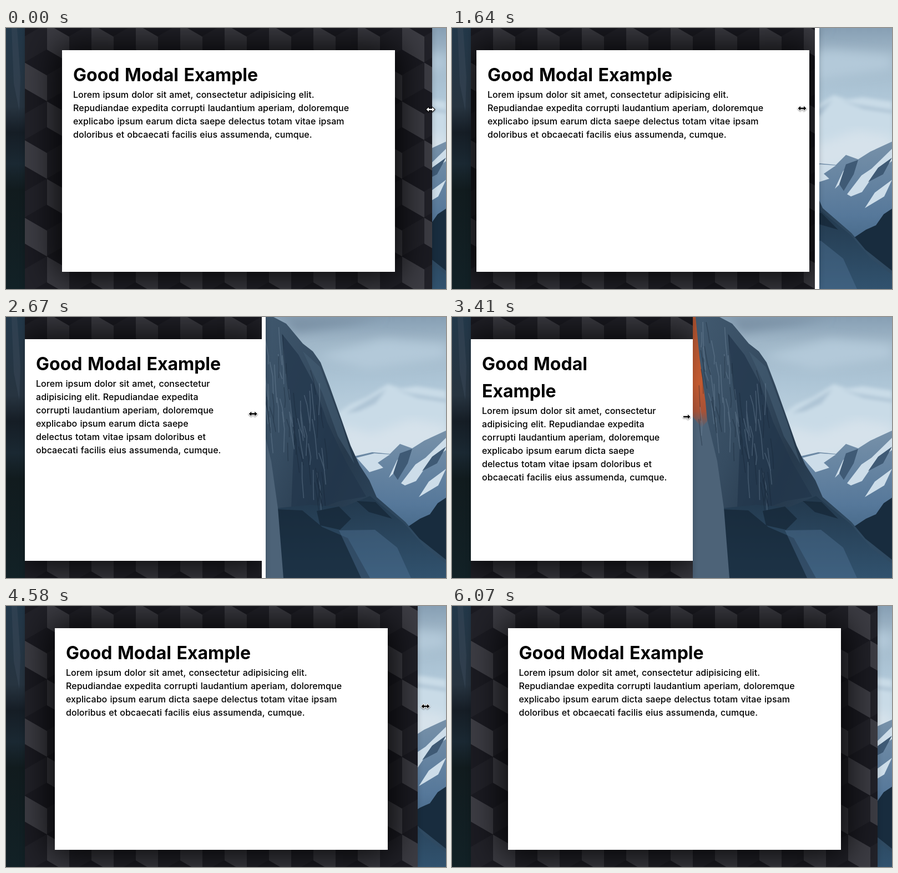
An HTML page that plays this animation: 793x471 px, repeating every 6170 ms.

```html
<!DOCTYPE html>
<html lang="en">
<head>
<meta charset="utf-8">
<style>
  html, body { margin: 0; width: 100%; height: 100%; overflow: hidden; background: #22303f; }
  #stage { position: relative; width: 793px; height: 471px; overflow: hidden; }
  svg { position: absolute; left: 0; top: 0; }
  #win { position: absolute; left: 34px; top: 0; height: 471px; overflow: hidden;
    background: #fff; box-shadow: 0 0 10px rgba(0,0,0,.2); }
  #page { position: absolute; left: 0; top: 0; height: 471px; overflow: hidden;
    background-color: #556;
    background-image:
      linear-gradient(30deg, #445 12%, transparent 12.5%, transparent 87%, #445 87.5%),
      linear-gradient(150deg, #445 12%, transparent 12.5%, transparent 87%, #445 87.5%),
      linear-gradient(30deg, #445 12%, transparent 12.5%, transparent 87%, #445 87.5%),
      linear-gradient(150deg, #445 12%, transparent 12.5%, transparent 87%, #445 87.5%),
      linear-gradient(60deg, #99a 25%, transparent 25.5%, transparent 75%, #99a 75%),
      linear-gradient(60deg, #99a 25%, transparent 25.5%, transparent 75%, #99a 75%);
    background-size: 80px 140px;
    background-position: 0 -8px, 0 -8px, 40px 62px, 40px 62px, 0 -8px, 40px 62px; }
  #shade { position: absolute; inset: 0; background: rgba(0,0,0,.6); }
  #modal { position: absolute; top: 40px; height: 400px; background: #fff;
    box-shadow: 0 0 60px 10px rgba(0,0,0,.9);
    font-family: Inter, "Open Sans", sans-serif; color: #000; white-space: pre; }
  h1, p { margin: 0 0 0 20px; }
  h1 { padding-top: 20px; font-size: 32px; line-height: 49px; font-weight: 700; word-spacing: 2px; }
  p { margin-top: -1px; font-size: 16px; line-height: 24px; font-weight: 500;
    letter-spacing: .04px; word-spacing: .8px; }
  #cursor { filter: drop-shadow(0 1px 1px rgba(0,0,0,.5)); }
</style>
</head>
<body>
<div id="stage">
  <svg width="793" height="471">
    <defs>
      <linearGradient id="sky" x2="0" y2="1">
        <stop offset="0" stop-color="#879fb4"/><stop offset=".1" stop-color="#a0b7c8"/>
        <stop offset=".25" stop-color="#adc5d6"/><stop offset=".45" stop-color="#c2d5e2"/>
      </linearGradient>
      <linearGradient id="cliff" x2="1" y2=".5">
        <stop offset="0" stop-color="#425a70"/><stop offset=".35" stop-color="#364c61"/>
        <stop offset=".6" stop-color="#26394c"/><stop offset="1" stop-color="#2f4a62"/>
      </linearGradient>
      <linearGradient id="hill" x2="0" y2="1">
        <stop offset="0" stop-color="#22384c"/><stop offset="1" stop-color="#31526e"/>
      </linearGradient>
      <linearGradient id="ridge" x2="0" y2="1">
        <stop offset="0" stop-color="#7791a9"/><stop offset=".5" stop-color="#56789a"/>
        <stop offset="1" stop-color="#2f506c"/>
      </linearGradient>
      <linearGradient id="flame" x2="0" y2="1">
        <stop offset="0" stop-color="#a8502f"/><stop offset=".6" stop-color="#c25a30"/>
        <stop offset=".85" stop-color="#a85237"/><stop offset="1" stop-color="#4d6378"/>
      </linearGradient>
      <linearGradient id="side" x2="0" y2="1">
        <stop offset="0" stop-color="#233849"/><stop offset=".3" stop-color="#273440"/>
        <stop offset=".4" stop-color="#151d25"/><stop offset=".52" stop-color="#1a2832"/>
        <stop offset=".62" stop-color="#111b1e"/><stop offset="1" stop-color="#122126"/>
      </linearGradient>
      <filter id="soft"><feGaussianBlur stdDeviation="9"/></filter>
      <filter id="mist"><feGaussianBlur stdDeviation="3"/></filter>
    </defs>
    <rect width="793" height="471" fill="url(#sky)"/>
    <g filter="url(#soft)">
      <path d="M500 0h180l-60 14-100 14z" fill="#7c92a6"/>
      <path d="M560 70l120-30 113 10v25l-140 20z" fill="#b3c9d9"/>
    </g>
    <g filter="url(#mist)">
      <path d="M590 180l30-22 30-13 38-24 24 8 28-4 53 8v125H600z" fill="#c9dbe7"/>
      <path d="M612 174l40-24 34-20-20 26-30 14zM700 130l30 8 63 10v6l-52-8z" fill="#aec4d5"/>
    </g>
    <g filter="url(#soft)">
      <path d="M600 195l60 15 70-25 63 10v30l-90 25-90 15z" fill="#d6e2eb"/>
    </g>
    <path d="M625 252l35-8 32 3 18-18 22 8 22-14 39-18v266H640z" fill="url(#ridge)"/>
    <path d="M632 254l32-8 28 2-22 15 10 9-25 8zM712 300l26-34 18-12 37-36v22l-32 24-22 32-20 8z
      M690 290l15-32 18-14-5 20zM744 325l18-28 31-23-14 30z" fill="#cddde9"/>
    <path d="M698 282l12-36 22-8-8 26-18 30zM750 278l18-26 25-18-16 30z" fill="#3f5a75"/>
    <path d="M722 380l24-16 18-8 14-20 15-10v145h-70z" fill="#182c3e"/>
    <path d="M434 0h48l23 12 30 36 18 14 14 20 16 42 22 62 16 46 16 35 18 28 13 30 52 45 25 30 48 38v33H434z"
      fill="url(#cliff)"/>
    <path d="M497 30l30 38 28 52 24 70 34 72 36 62-48 8-42 15-45 1 5-130z" fill="#22364a" opacity=".7"/>
    <path d="M535 62l31 28 38 100 24 75-30-50-28-78z" fill="#466076" opacity=".55"/>
    <path d="M488 345l60-6 60 4 48-20 62 50 38 44 37 28v26H498z" fill="url(#hill)"/>
    <path d="M490 347l44 2 36 30 46 20 40 72H498zM632 332l34 2 30 30-42-12zM560 350l40-8 22 22-20 20-36-8z"
      fill="#152635" opacity=".7"/>
    <path d="M600 385l65-1 40 32 25 55h-90z" fill="#54779a" opacity=".4"/>
    <path d="M434 150l20 10 6 26 18 74 12 85 10 126h-66z" fill="#4d6378"/>
    <path d="M434 0h5l7 72 11 82 3 34-10 12-16-20z" fill="url(#flame)"/>
    <g id="streaks" fill="none" stroke-width="1.5" opacity=".35"></g>
    <rect width="34" height="471" fill="url(#side)"/>
    <path d="M10 0h10l6 90-2 60-10-50z" fill="#3b4958" opacity=".5"/>
  </svg>
  <div id="win"><div id="page"><div id="shade"></div>
    <div id="modal"><h1></h1><p></p></div>
  </div></div>
  <svg width="793" height="471"><path id="cursor" stroke-width="2" stroke-linejoin="round" paint-order="stroke"/></svg>
</div>
<script>
const $ = s => document.querySelector(s);
const LOOP = 6170, START = 900, STEP = 147.7;

const words = ('Lorem ipsum dolor sit amet, consectetur adipisicing elit. Repudiandae expedita ' +
  'corrupti laudantium aperiam, doloremque explicabo ipsum earum dicta saepe delectus totam ' +
  'vitae ipsam doloribus et obcaecati facilis eius assumenda, cumque.').split(' ');

// [smallest text width, indices of the words that open a new line]
const wraps = [
  [507, [8, 14, 23]], [500, [8, 13, 21, 29]], [449, [8, 13, 20, 28]], [438, [8, 13, 19, 26]],
  [406, [7, 12, 18, 25]], [366, [6, 11, 15, 22, 28]], [0, [6, 10, 14, 19, 25]]
];

// [step, value...]
const edgeKeys = [[-1, 768], [0, 765], [2, 735], [5, 654], [9, 525], [13, 440], [14, 434],
  [17, 434], [21, 608], [25, 742], [27, 767]];
const cursorKeys = [[-1, 765, 147], [0, 758, 147], [5, 631, 145], [9, 512, 165], [13, 423, 178],
  [17, 423, 180], [21, 633, 182], [25, 756, 181], [27, 763, 181], [29, 763, 181], [35, 763, 490]];

function at(keys, k, col = 1) {
  const i = keys.findIndex(p => p[0] >= k);
  if (i < 0) return keys[keys.length - 1][col];
  if (i === 0) return keys[0][col];
  const a = keys[i - 1], b = keys[i];
  return a[col] + (b[col] - a[col]) * (k - a[0]) / (b[0] - a[0]);
}

const BOTH = 'M-7.5 0L-3-4V-1.3H3V-4L7.5 0 3 4V1.3H-3V4Z';
const RIGHT = 'M-6-1.3H2V-4L6.5 0 2 4V1.3H-6Z';

function draw(t) {
  const k = t < START ? -1 : Math.floor((t - START) / STEP + .12);
  const edge = Math.round(at(edgeKeys, k));
  const width = edge - 34;
  // the page repaints a little behind a shrinking window
  const gap = Math.max(0, Math.round((at(edgeKeys, k - 1) - edge) * .31));
  $('#win').style.width = width + gap + 'px';
  $('#page').style.width = width + 'px';

  const box = Math.min(600, width), room = box - 70;
  $('#modal').style.width = box + 'px';
  $('#modal').style.left = (width - box) / 2 + 'px';
  $('h1').textContent = room < 333 ? 'Good Modal\nExample' : 'Good Modal Example';
  const breaks = wraps.find(w => room >= w[0])[1];
  $('p').textContent = words.map((w, i) => (i ? breaks.includes(i) ? '\n' : ' ' : '') + w).join('');

  const cursor = $('#cursor'), hollow = k < 0;
  cursor.setAttribute('d', k > 13 && k < 18 ? RIGHT : BOTH);
  cursor.setAttribute('transform', `translate(${at(cursorKeys, k)} ${at(cursorKeys, k, 2)})`);
  cursor.setAttribute('fill', hollow ? '#fff' : '#000');
  cursor.setAttribute('stroke', hollow ? '#000' : '#fff');
}

// seeded cracks down the rock face
let seed = 7;
const rnd = () => (seed = seed * 16807 % 2147483647) / 2147483647;
for (let i = 0; i < 70; i++) {
  const x = 445 + rnd() * 130, top = Math.max(0, (x - 490) * 1.6) + rnd() * 200;
  const line = document.createElementNS('http://www.w3.org/2000/svg', 'path');
  line.setAttribute('d', `M${x} ${top}l${rnd() * 6} ${15 + rnd() * 20} ${rnd() * 8 - 2} ${10 + rnd() * 35}`);
  line.setAttribute('stroke', rnd() < .5 ? '#142232' : '#7f95aa');
  $('#streaks').append(line);
}

const begin = performance.now();
(function tick() {
  draw((performance.now() - begin) % LOOP);
  requestAnimationFrame(tick);
})();
</script>
</body>
</html>
```
